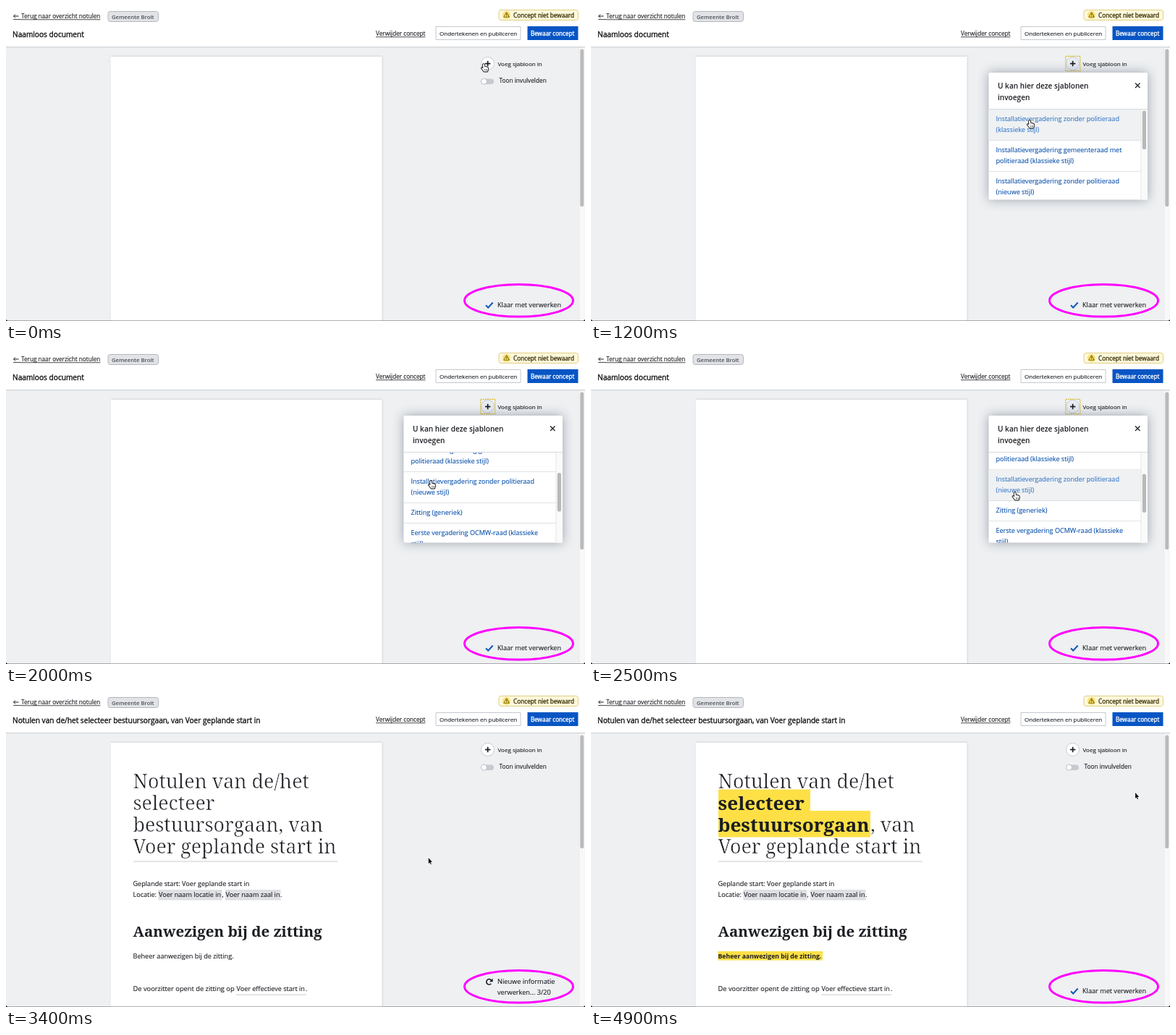
These frames come from a looping animation (800 px wide and 435 px high, 5 s). An HTML page with a canvas:

```html
<!DOCTYPE html>
<html lang="nl">
<head>
<meta charset="utf-8">
<title>Sjabloon invoegen</title>
<style>
html, body { margin: 0; width: 100%; height: 100%; overflow: hidden; background: #eef0f2; }
canvas { display: block; width: 800px; height: 435px; }
</style>
</head>
<body>
<canvas id="stage"></canvas>
<script>
const W = 800, H = 435, LOOP = 5000, STEP = 100;
const SANS = '"Open Sans", "Noto Sans", sans-serif';
const SERIF = '"Noto Serif", "Liberation Serif", serif';
const INK = '#1b1d22', BLUE = '#0755c4', LINK = '#0a51ab', YELLOW = '#fee046';

// Moments at which the interface switches state.
const OPEN = 400, CLICK = 3100, INSERT = 3300, MARK = 3700, DONE = 4100;

const canvas = document.getElementById('stage');
const ctx = canvas.getContext('2d');
const ratio = window.devicePixelRatio || 1;
canvas.width = W * ratio;
canvas.height = H * ratio;

const SCROLL = [[1500, 0], [1600, 8], [1800, 35], [2000, 59], [2200, 62]];
const POINTER = [
  [800, 660, 80], [1000, 645, 104], [1200, 606, 158], [1400, 587, 182],
  [2300, 587, 182], [2600, 585, 206], [2900, 582, 229], [3200, 583.7, 229],
  [3900, 583.7, 229], [4200, 622, 214], [4600, 718, 160], [4900, 752, 139]
];

const ITEMS = [
  ['Installatievergadering zonder politieraad', '(klassieke stijl)'],
  ['Installatievergadering gemeenteraad met', 'politieraad (klassieke stijl)'],
  ['Installatievergadering zonder politieraad', '(nieuwe stijl)'],
  ['Zitting (generiek)'],
  ['Eerste vergadering OCMW-raad (klassieke', 'stijl)']
];

// Linear interpolation through [time, ...values] keys.
function track(keys, t) {
  if (t <= keys[0][0]) return keys[0].slice(1);
  for (let i = 1; i < keys.length; i++) {
    const a = keys[i - 1], b = keys[i];
    if (t < b[0]) {
      const p = (t - a[0]) / (b[0] - a[0]);
      return a.slice(1).map((v, k) => v + (b[k + 1] - v) * p);
    }
  }
  return keys[keys.length - 1].slice(1);
}

function outline(str, x, y, color, width) {
  ctx.lineJoin = 'round';
  ctx.strokeStyle = color;
  ctx.lineWidth = width;
  ctx.strokeText(str, x, y);
  ctx.lineJoin = 'miter';
}

// Light and medium weights are made by thinning or thickening the regular face.
function text(str, x, y, size = 9.05, weight = 400, color = INK, family = SANS) {
  ctx.font = `${weight >= 600 ? weight : 400} ${size}px ${family}`;
  ctx.fillStyle = color;
  ctx.fillText(str, x, y);
  if (weight === 300) outline(str, x, y, '#fff', 0.6);
  if (weight === 400) outline(str, x, y, color, 0.12);
  if (weight === 500) outline(str, x, y, color, 0.35);
  return ctx.measureText(str).width;
}

function linkText(str, x, y, size) {
  const w = text(str, x, y, size);
  rect(x, y + 1.4, w, 0.8, INK);
}

function rect(x, y, w, h, color) {
  ctx.fillStyle = color;
  ctx.fillRect(x, y, w, h);
}

function box(x, y, w, h, r, fill, stroke) {
  ctx.beginPath();
  ctx.roundRect(x, y, w, h, r);
  ctx.fillStyle = fill;
  ctx.fill();
  if (stroke) {
    ctx.strokeStyle = stroke;
    ctx.lineWidth = 1;
    ctx.stroke();
  }
}

function disc(x, y, r, fill, stroke) {
  box(x - r, y - r, 2 * r, 2 * r, r, fill, stroke);
}

function line(points, color, width) {
  ctx.beginPath();
  points.forEach(([x, y]) => ctx.lineTo(x, y));
  ctx.strokeStyle = color;
  ctx.lineWidth = width;
  ctx.stroke();
}

function withShadow(color, blur, draw) {
  ctx.save();
  ctx.shadowColor = color;
  ctx.shadowBlur = blur * ratio;
  draw();
  ctx.restore();
}

function drawHeader(inserted) {
  rect(0, 0, W, 56, '#fff');
  rect(0, 56, W, 1, '#d3d6da');
  rect(0, 57, W, 1, '#e6e8ea');

  line([[17.5, 14], [10.5, 14]], INK, 1);
  line([[13, 11.5], [10.5, 14], [13, 16.5]], INK, 1);
  rect(10, 18, 11, 0.8, INK);
  linkText('Terug naar overzicht notulen', 21, 17, 8.2);

  box(141, 7.5, 69.5, 14, 3, '#e1e3e7', '#b4b7bd');
  text('Gemeente Brolt', 146, 17.5, 7.7, 600, '#4b515a');

  const title = inserted
    ? 'Notulen van de/het selecteer bestuursorgaan, van Voer geplande start in'
    : 'Naamloos document';
  text(title, 9, 43, 10.15, 500, '#111');

  box(681, 5.5, 109.5, 14, 3, '#fdf8dc', '#e2cf83');
  disc(691.5, 12.5, 5.5, '#f9e27b');
  line([[691.5, 8.7], [695.3, 15.3], [687.7, 15.3], [691.5, 8.7], [695.3, 15.3]], '#8a7000', 1);
  rect(691, 10.8, 1, 2.2, '#6b5700');
  rect(691, 13.6, 1, 0.9, '#6b5700');
  text('Concept niet bewaard', 701, 16, 8.25, 500, '#453a12');

  linkText('Verwijder concept', 511, 41, 8.2);
  box(594, 28.5, 117, 18, 0, '#fff', '#c3c7ce');
  text('Ondertekenen en publiceren', 599, 40.7, 8);
  rect(720.5, 28, 70, 19, BLUE);
  text('Bewaar concept', 725, 41, 8.1, 500, '#fff');
}

function heading(str, x, y, bold) {
  text(str, x, y, bold ? 26.1 : 26.8, bold ? 700 : 300, INK, SERIF);
}

function drawDocument(marked) {
  if (marked) {
    rect(176, 134.5, 127, 31, YELLOW);
    rect(176, 164, 210, 36.5, YELLOW);
  }
  heading('Notulen van de/het', 175.5, 133.2);
  heading('selecteer', 175.5, 163.2, marked);
  if (marked) {
    heading('bestuursorgaan', 175.5, 193.2, true);
    heading(', van', 386, 193.2);
  } else {
    heading('bestuursorgaan, van', 175.5, 193.2);
  }
  heading('Voer geplande start in', 175.5, 223.2);
  rect(176, 233.5, 282, 1, '#c9ccd1');

  text('Geplande start: Voer geplande start in', 175.5, 268.3, 9.1);

  rect(210.5, 273, 88, 14.5, '#dfe0e4');
  rect(303, 273, 76.5, 14.5, '#dfe0e4');
  text('Locatie:', 175.5, 283.3);
  text('Voer naam locatie in', 211, 283.3);
  text(',', 298.5, 283.3);
  text('Voer naam zaal in', 303.5, 283.3);
  text('.', 379, 283.3);

  text('Aanwezigen bij de zitting', 175.5, 337.5, 20.5, 700, INK, SERIF);

  if (marked) rect(175.5, 358, 144.5, 12.5, YELLOW);
  text('Beheer aanwezigen bij de zitting.', 175.5, 367.5, marked ? 8.7 : 9.1, marked ? 700 : 400);

  text('De voorzitter opent de zitting op', 175.5, 412.5, 9.3);
  text('Voer effectieve start in', 318.5, 412.5);
  text('.', 414, 412.5);
  rect(318, 417.5, 97, 1, '#c9ccd1');
}

function drawTools(focused) {
  disc(665.5, 79.5, 9, focused ? '#e9edf3' : '#fff', '#c8ccd3');
  if (focused) {
    ctx.setLineDash([2, 1]);
    ctx.strokeStyle = '#d9bd2b';
    ctx.lineWidth = 1.2;
    ctx.strokeRect(655.8, 69.3, 20, 20.4);
    ctx.setLineDash([]);
  }
  rect(662, 78.7, 7.4, 1.7, INK);
  rect(664.8, 75.8, 1.7, 7.4, INK);
  text('Voeg sjabloon in', 679.5, 82.6, 8);

  box(656.5, 100.5, 17.5, 7.5, 3.75, '#c6cad0');
  disc(660.5, 104.2, 4, '#fff', '#b9bdc4');
  text('Toon invulvelden', 681.5, 106.3, 8.25);
}

function drawStatus(t) {
  if (t >= INSERT && t < DONE) {
    const count = Math.floor(1 + 2.6 * (t - INSERT) / STEP);
    ctx.beginPath();
    ctx.arc(667.5, 400.3, 3.7, 0.7, 5.6);
    ctx.strokeStyle = INK;
    ctx.lineWidth = 1.6;
    ctx.stroke();
    ctx.beginPath();
    ctx.moveTo(672.6, 395.4);
    ctx.lineTo(672.6, 400.2);
    ctx.lineTo(667.9, 400.2);
    ctx.fillStyle = INK;
    ctx.fill();
    text('Nieuwe informatie', 679, 403.2, 9.2);
    text(`verwerken... ${count}/20`, 679, 418.2, 9.2);
  } else {
    line([[663, 413.2], [666.2, 416.5], [672.7, 409.5]], '#1259b8', 2);
    text('Klaar met verwerken', 679, 416, 9.15);
  }
  ctx.beginPath();
  ctx.ellipse(708.5, 406.8, 75, 22.3, 0, 0, Math.PI * 2);
  ctx.strokeStyle = '#ff00ff';
  ctx.lineWidth = 3;
  ctx.stroke();
}

function hoveredItem(t, y) {
  if (t < 1200 || (t > 1800 && t < 2200)) return -1;
  if (t <= 1800) return 0;
  return y < 209 ? 2 : 3;
}

function drawPopup(t, pointerY) {
  const [scroll] = track(SCROLL, t);
  const hover = hoveredItem(t, pointerY);

  withShadow('rgba(40,50,70,.42)', 15, () => box(549.5, 92, 219.5, 175.5, 2, '#fff'));
  text('U kan hier deze sjablonen', 562, 113.7, 10.1, 600);
  text('invoegen', 562, 130.2, 10.1, 600);
  line([[752, 106.5], [758.5, 113]], INK, 1.2);
  line([[758.5, 106.5], [752, 113]], INK, 1.2);

  ctx.save();
  ctx.beginPath();
  ctx.rect(549.5, 142, 219.5, 125.5);
  ctx.clip();
  let top = 142.5 - scroll;
  ITEMS.forEach((lines, i) => {
    const h = 13 + 15 * lines.length;
    const on = i === hover;
    if (on) rect(549.5, top, 210.5, h, '#eff1f3');
    lines.forEach((s, k) => text(s, 559.5, top + 16.8 + 15 * k, 9.05, 400, on ? '#3a7ac6' : LINK));
    rect(549.5, top + h - 0.5, 210.5, 1, '#dfe2e6');
    top += h;
  });
  rect(760, 142, 9, 126, '#fafafa');
  rect(759.5, 142, 1, 126, '#e6e6e6');
  box(761.8, 144.5 + scroll * 0.45, 5.2, 53.5, 2.6, '#b9b9bb');
  ctx.restore();
  rect(549.5, 142, 219.5, 1, '#d5d8dd');
}

function shape(points, x, y, fill, stroke, width) {
  ctx.beginPath();
  points.forEach(([dx, dy]) => ctx.lineTo(x + dx, y + dy));
  ctx.closePath();
  ctx.lineJoin = 'round';
  ctx.strokeStyle = stroke;
  ctx.lineWidth = width;
  ctx.stroke();
  ctx.fillStyle = fill;
  ctx.fill();
  ctx.lineJoin = 'miter';
}

function drawHand(x, y) {
  shape([[-1, 0.5], [0, 0], [1, 0.5], [1.4, 4], [3, 3.8], [4.5, 4.4], [6, 5.2],
    [6.2, 7.5], [5.2, 10.5], [0.4, 10.5], [-1.5, 8], [-3.2, 5.8], [-2.6, 5], [-0.7, 6.3]],
    x, y, '#fff', '#111', 1.8);
  for (const dx of [1.2, 2.8, 4.3]) rect(x + dx, y + 7, 0.6, 2.5, '#333');
}

function drawArrow(x, y) {
  shape([[0, 0], [0, 8], [1.7, 6.4], [3, 9.2], [4.1, 8.7], [2.9, 6], [5.3, 5.8]],
    x, y, '#111', '#fff', 1.4);
}

function drawPointer(t, x, y) {
  const overList = t >= OPEN && t < INSERT && y > 142;
  const overPlus = Math.hypot(x - 665.5, y - 79.5) < 10;
  (overList || overPlus ? drawHand : drawArrow)(x, y);
}

function draw(t) {
  const inserted = t >= INSERT;
  const [px, py] = track(POINTER, t);
  ctx.setTransform(ratio, 0, 0, ratio, 0, 0);
  rect(0, 0, W, H, '#eef0f2');

  withShadow('rgba(60,70,90,.28)', 3, () => rect(144.5, 70, 375, H, '#fff'));
  if (inserted) drawDocument(t >= MARK);
  drawHeader(inserted);

  rect(792, 58, 8, H, '#f8f8f9');
  rect(791.5, 58, 0.7, H, '#e4e6e8');
  box(793.3, 59.5, 5, inserted ? 156.5 : 217.5, 2.5, '#b9babc');

  drawTools(t >= OPEN && t < CLICK);
  drawStatus(t);
  if (t >= OPEN && !inserted) drawPopup(t, py);

  rect(0, 434.3, W, 0.7, '#8b8d90');
  shape([[0, 0], [0, 2], [2, 2]], 0, 433, '#222', '#222', 0.5);
  shape([[0, 0], [0, 2], [-2, 2]], W, 433, '#222', '#222', 0.5);
  drawPointer(t, px, py);
}

const start = performance.now();
function tick() {
  const t = (performance.now() - start) % LOOP;
  draw(Math.floor(t / STEP) * STEP);
  requestAnimationFrame(tick);
}
tick();
</script>
</body>
</html>
```
